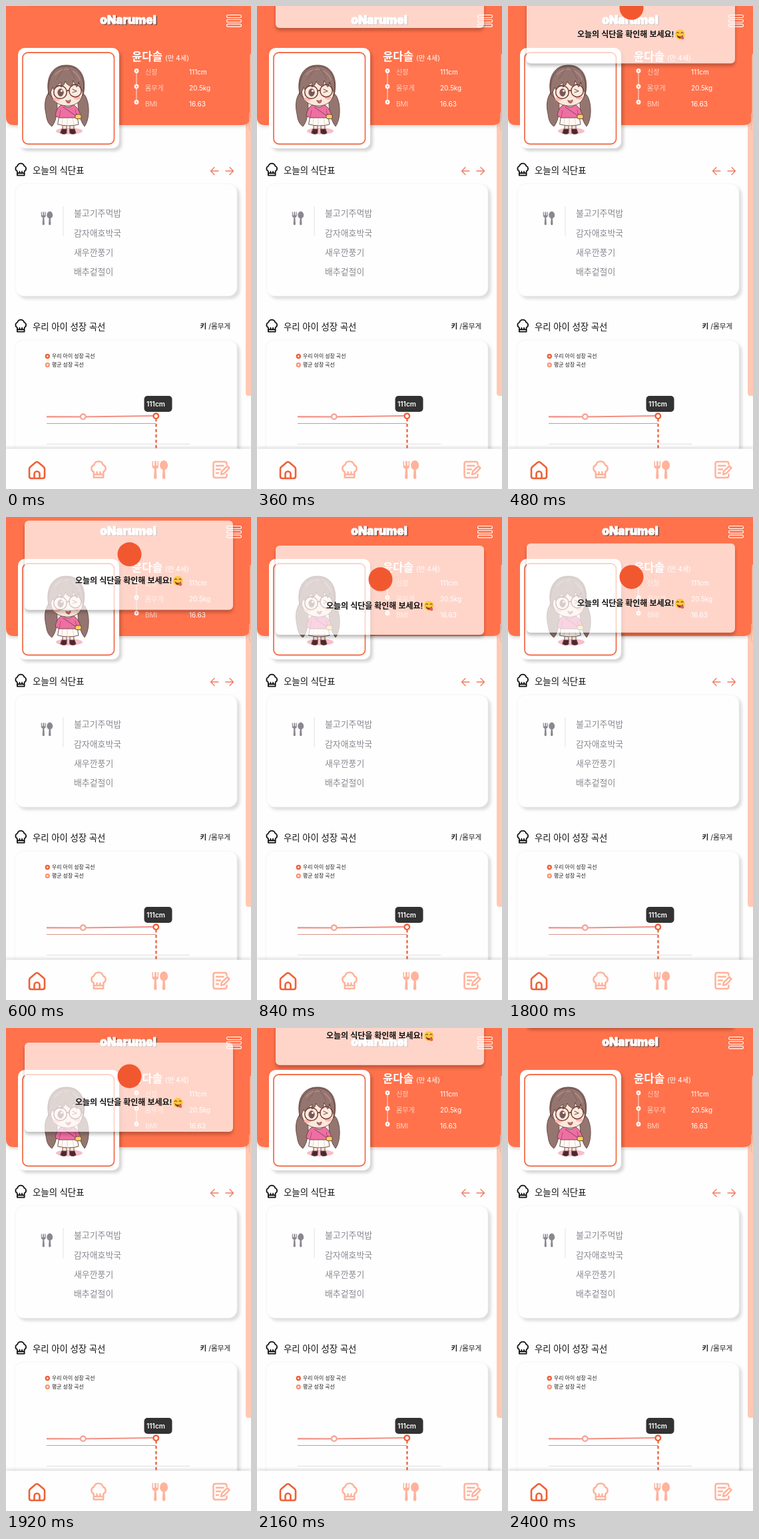
Animation, 368 px wide and 726 px high, one loop 2520 ms. Source, as an HTML page:

```html
<!DOCTYPE html>
<html lang="ko">
<head>
<meta charset="utf-8">
<title>오늘의 식단</title>
<style>
  html, body { margin: 0; width: 100%; height: 100%; overflow: hidden; background: #fefefe; }
  #stage { position: relative; width: 368px; height: 726px; overflow: hidden; }
  svg { position: absolute; left: 0; top: 0; display: block; }
  text { font-family: Inter, "Noto Sans CJK KR", "Noto Sans KR", "Noto Sans CJK", sans-serif; white-space: pre; }
  #toast {
    position: absolute; left: 28px; top: 0; width: 313px; height: 134px;
    border-radius: 6px; background: rgba(255,255,255,.7);
    box-shadow: 0 4px 5px rgba(0,0,0,.25);
  }
  .line { fill: none; stroke-linecap: round; stroke-linejoin: round; }
  .card { fill: #fefefe; stroke: #f1f1f1; stroke-width: .7; filter: drop-shadow(4px 4px 2px rgba(0,0,0,.13)); }
  .head { font-size: 13.4px; font-weight: 500; fill: #111; }
  .dish { font-size: 12.9px; fill: #8a8991; }
  .key { font-size: 7.9px; font-weight: 500; fill: #222; }
  .stat { font-size: 10px; fill: #fff; }
  .dim { fill: #ffd0c2; }
</style>
</head>
<body>
<div id="stage">
<svg width="368" height="726" viewBox="0 0 368 726">
  <defs>
    <symbol id="hat" viewBox="0 0 24 24" overflow="visible">
      <path class="line" d="M6 21.3V14.2A4.6 4.6 0 0 1 6.4 5.6A5.8 5.8 0 0 1 17.6 5.6A4.6 4.6 0 0 1 18 14.2V21.3Z M6 17.6H18 M10 17.4V14.6 M14 17.4V14.6"/>
    </symbol>
    <symbol id="cutlery" viewBox="0 0 25 28" overflow="visible">
      <path d="M1 1V8.5Q1 12 4.4 12.8L3.6 25.5Q3.6 28 5.8 28T8 25.5L7.2 12.8Q10.6 12 10.6 8.5V1H9V8H7.2V1H4.6V8H2.6V1Z"/>
      <path d="M18.6 0C22 0 24.6 3.6 24.6 7.8C24.6 11 22.8 13.4 20.2 14.2L20.9 25.5Q20.9 28 18.6 28T16.3 25.5L17 14.2C14.4 13.4 12.6 11 12.6 7.8C12.6 3.6 15.2 0 18.6 0Z"/>
    </symbol>
  </defs>

  <!-- header -->
  <path d="M360 72H368V586H364Q360 586 360 582Z" fill="#ffc9b4"/>
  <path d="M0 0H368V72H366.500V167Q366 179 354 179H12Q0 179 0 167Z" fill="#ff724c" style="filter:drop-shadow(0 3px 2px rgba(0,0,0,.13))"/>
  <rect x="365.500" y="160" width="6" height="27" rx="2" fill="none" stroke="#d5bdb6"/>
  <g text-anchor="middle" font-size="17.200" font-weight="900" stroke-width="1" stroke-linejoin="round">
    <text x="185" y="28.300" fill="#7d4537" stroke="#7d4537">oNarumel</text>
    <text x="183.500" y="26.800" fill="#fff" stroke="#fff">oNarumel</text>
  </g>
  <g fill="none" stroke="#fff" stroke-width="1.100">
    <rect x="331.500" y="13.500" width="22" height="4" rx="2"/>
    <rect x="331.500" y="20.300" width="22" height="4" rx="2"/>
    <rect x="331.500" y="27.100" width="22" height="4" rx="2"/>
  </g>

  <!-- profile -->
  <rect x="18" y="63" width="152" height="151" rx="10" fill="#fff" style="filter:drop-shadow(4px 4px 2px rgba(0,0,0,.16))"/>
  <rect x="25" y="70" width="137.500" height="137.500" rx="8" fill="#fff" stroke="#f2704e" stroke-width="1.800"/>
  <g stroke="#62443f" stroke-width=".9" stroke-linejoin="round" stroke-linecap="round">
    <ellipse cx="95" cy="188" rx="20" ry="5" fill="#f6bfc8" stroke="none"/>
    <path d="M66 128C58 136 57 150 60 162C61 172 64 178 69 181C77 172 79 151 75 134Z" fill="#957570"/>
    <path d="M108 132C107 150 109 170 118 181C125 172 126 151 121 139C119 133 114 128 108 132Z" fill="#957570"/>
    <path d="M85 175V187H91V175ZM96 175V187H102V175Z" fill="#fde3d4"/>
    <path d="M84 185H91V191Q87 194 82 191ZM96 185H103L105 191Q100 194 96 191Z" fill="#4e2630"/>
    <path d="M80 166H107L109 178Q94 182 78 178Z" fill="#fffaf6"/>
    <path d="M85 168L84 179M92 168V180M100 168L102 179" fill="none" stroke="#d9c3bd" stroke-width=".7"/>
    <path d="M83 149C78 151 75 158 74 165L80 168H106L112 164C110 157 106 151 102 149Z" fill="#ee6fa1"/>
    <path d="M82 157L80 167M104 156L106 166" fill="none" stroke="#b64673"/>
    <path d="M86 149Q93 155 100 149L97 147H88Z" fill="#fff"/>
    <path d="M86 152L105 165" fill="none" stroke="#704060"/>
    <rect x="104" y="163" width="9" height="6.500" rx="2" fill="#ffd25b"/>
    <path d="M64 132C59 107 70 89 90 89C112 88 122 108 116 134C105 148 76 149 64 132Z" fill="#957570"/>
    <path d="M67 123C66 141 77 150 92 150C108 150 117 140 115 123L105 113H74Z" fill="#fee8db"/>
    <path d="M64 132C62 106 73 91 90 90C109 90 119 106 116 130C113 126 111 120 109 114Q108 121 106 122Q103 116 101 112L99 121Q91 119 89 113Q87 121 82 122L83 115Q75 119 72 126L70 122Q68 130 64 132Z" fill="#957570"/>
    <path d="M74 103Q82 94 94 95M101 98Q109 104 111 111" fill="none" stroke="#b5938c" stroke-width="1.400"/>
    <path d="M89 90Q83 101 76 110M91 90Q99 98 104 110" fill="none" stroke="#765750" stroke-width=".7"/>
    <ellipse cx="76" cy="140" rx="5" ry="2.700" fill="#ffb9b1" stroke="none"/>
    <ellipse cx="107" cy="138" rx="5" ry="2.700" fill="#ffb9b1" stroke="none"/>
    <ellipse cx="82" cy="130" rx="4.200" ry="5.600" fill="#653a37"/>
    <circle cx="83.500" cy="127.500" r="1.600" fill="#fff" stroke="none"/>
    <path d="M100 125L106 128L100 130M76 121Q80 118 84 120M101 118Q105 117 108 120" fill="none" stroke-width="1.200"/>
    <g fill="#fff" fill-opacity=".15" stroke="#753f38" stroke-width="1.500">
      <circle cx="81.500" cy="129.500" r="9.800"/><circle cx="104" cy="127.500" r="9.200"/>
      <path d="M91.300 128Q93 126 95 127.500" fill="none"/>
    </g>
    <path d="M90 142Q94 144 97 141Q97 146 93.500 146Q91 146 90 142Z" fill="#e2616a" stroke-width=".7"/>
  </g>

  <text x="189" y="82" font-size="16.700" font-weight="700" fill="#fff">윤다솔</text>
  <text x="239" y="82" font-size="10.300" fill="#fff">(만 4세)</text>
  <path d="M196 97V145" stroke="#ffe4da"/>
  <g fill="#ff9e83" stroke="#fff" stroke-width="2.200">
    <circle cx="196" cy="97.500" r="2.300"/><circle cx="196" cy="121" r="2.300"/><circle cx="196" cy="144.500" r="2.300"/>
  </g>
  <g class="stat">
    <text class="dim" x="209" y="102.500">신장</text><text x="275" y="102.500">111cm</text>
    <text class="dim" x="209" y="127">몸무게</text><text x="275" y="127">20.5kg</text>
    <text class="dim" x="209" y="151">BMI</text><text x="275" y="151">16.63</text>
  </g>

  <!-- menu of the day -->
  <use href="#hat" x="11.500" y="235.500" width="21.500" height="21.500" stroke="#111" stroke-width="2"/>
  <text class="head" x="40" y="252">오늘의 식단표</text>
  <path class="line" d="M319 248H307.500M313 242.500L307.500 248L313 253.500M330 248H341.500M336 242.500L341.500 248L336 253.500" stroke="#f37a60" stroke-width="1.300"/>
  <rect class="card" x="14" y="267" width="333" height="169" rx="13"/>
  <use href="#cutlery" x="52" y="306" width="18.500" height="26" fill="#8b8790"/>
  <path d="M86 301V346" stroke="#e2e2e6"/>
  <g class="dish">
    <text x="102" y="316">불고기주먹밥</text>
    <text x="102" y="345.500">감자애호박국</text>
    <text x="102" y="374.500">새우깐풍기</text>
    <text x="102" y="404">배추겉절이</text>
  </g>

  <!-- growth chart -->
  <use href="#hat" x="11.500" y="470.500" width="21.500" height="21.500" stroke="#111" stroke-width="2"/>
  <text class="head" x="40" y="487">우리 아이 성장 곡선</text>
  <text x="291.500" y="484.500" font-size="10.600" fill="#222"><tspan font-weight="700">키</tspan> /몸무게</text>
  <rect class="card" x="13" y="502" width="334" height="240" rx="13"/>
  <g fill="#fff" stroke-width="2.400">
    <circle cx="62.300" cy="526.500" r="2.500" stroke="#ee6037"/>
    <circle cx="62.300" cy="539.500" r="2.500" stroke="#f7987c"/>
  </g>
  <text class="key" x="69" y="529.300">우리 아이 성장 곡선</text>
  <text class="key" x="69" y="542.300">평균 성장 곡선</text>
  <path d="M61 658.500H276" stroke="#dedede"/>
  <path d="M61 627.500H225" stroke="#d8958b"/>
  <path d="M61 617.300L116 617.500L225 616" fill="none" stroke="#f38e83" stroke-width="2.200"/>
  <path d="M225.500 620V666" stroke="#e8623f" stroke-width="2.300" stroke-dasharray="4.500 3.500"/>
  <g fill="#fff" stroke-width="2.400">
    <circle cx="115.800" cy="617.300" r="3.800" stroke="#f3a796"/>
    <circle cx="225.300" cy="616.300" r="3.800" stroke="#ee6037"/>
  </g>
  <rect x="207.500" y="586" width="42" height="24" rx="5" fill="#323232"/>
  <text x="211" y="601.700" font-size="10.200" font-weight="600" fill="#fff">111cm</text>

  <!-- tab bar -->
  <rect y="665.500" width="368" height="62" fill="#fefefe" style="filter:drop-shadow(0 -2px 2px rgba(0,0,0,.14))"/>
  <path class="line" d="M35 696Q35 694 36.500 692.800L44.500 686Q46.500 684.500 48.500 686L56.500 692.800Q58 694 58 696V707Q58 710 55 710H38Q35 710 35 707ZM42.500 709.500V703.500A4 4 0 0 1 50.500 703.500V709.500" stroke="#ee6037" stroke-width="2.600"/>
  <use href="#hat" x="124.500" y="683" width="29" height="29" stroke="#ffb39c" stroke-width="2.100"/>
  <use href="#cutlery" x="218.500" y="683" width="25" height="28" fill="#ffb39c"/>
  <g class="line" stroke="#ffb39c" stroke-width="2.500">
    <path d="M331.500 689V688Q331.500 685 328.500 685H314.500Q311.500 685 311.500 688V706Q311.500 709 314.500 709H328.500Q331.500 709 331.500 706V704M316 691H326.500M316 696.500H322M316 702H319"/>
    <path d="M323 704L324 699.500L332.500 691.500L335.500 694.500L327.500 702.800Z"/>
  </g>
</svg>

<div id="toast">
  <svg width="313" height="134" viewBox="0 0 313 134">
    <circle cx="157.500" cy="50.500" r="18" fill="#f2582f"/>
    <text x="76" y="94.500" font-size="12" font-weight="600" fill="#111">오늘의 식단을 확인해 보세요!</text>
    <circle cx="230.300" cy="90.500" r="7.400" fill="#ffc93c"/>
    <path d="M225.500 91Q230 95.500 235 91.500Q235 96.500 230 96.500Q226 96 225.500 91Z" fill="#7b3d22"/>
    <path d="M231 93.800Q234 92.500 236 94.500Q237 98 234 98Q231.500 97.500 231 93.800Z" fill="#f0556c"/>
    <path class="line" d="M225.500 88.500Q227 86 228.500 88.500M232 88.500Q233.500 86 235 88.500" stroke="#6a3a20" stroke-width="1.100"/>
  </svg>
</div>
</div>

<script>
const LOOP = 2520, STEP = 120, SLIDE = 960, LEAVE = 1620;
const HIDDEN = -140, TRAVEL = 184.5;
const toast = document.getElementById("toast");

function ease(x) {
  x = Math.min(1, Math.max(0, x));
  return x < .5 ? 4 * x ** 3 : 1 - 4 * (1 - x) ** 3;
}

function draw(now) {
  const t = Math.floor((now % LOOP) / STEP) * STEP;
  const shown = ease(t / SLIDE) - ease((t - LEAVE) / SLIDE);
  toast.style.transform = `translateY(${(HIDDEN + TRAVEL * shown).toFixed(2)}px)`;
}

const start = performance.now();
function tick() {
  draw(performance.now() - start);
  requestAnimationFrame(tick);
}
tick();
</script>
</body>
</html>
```
